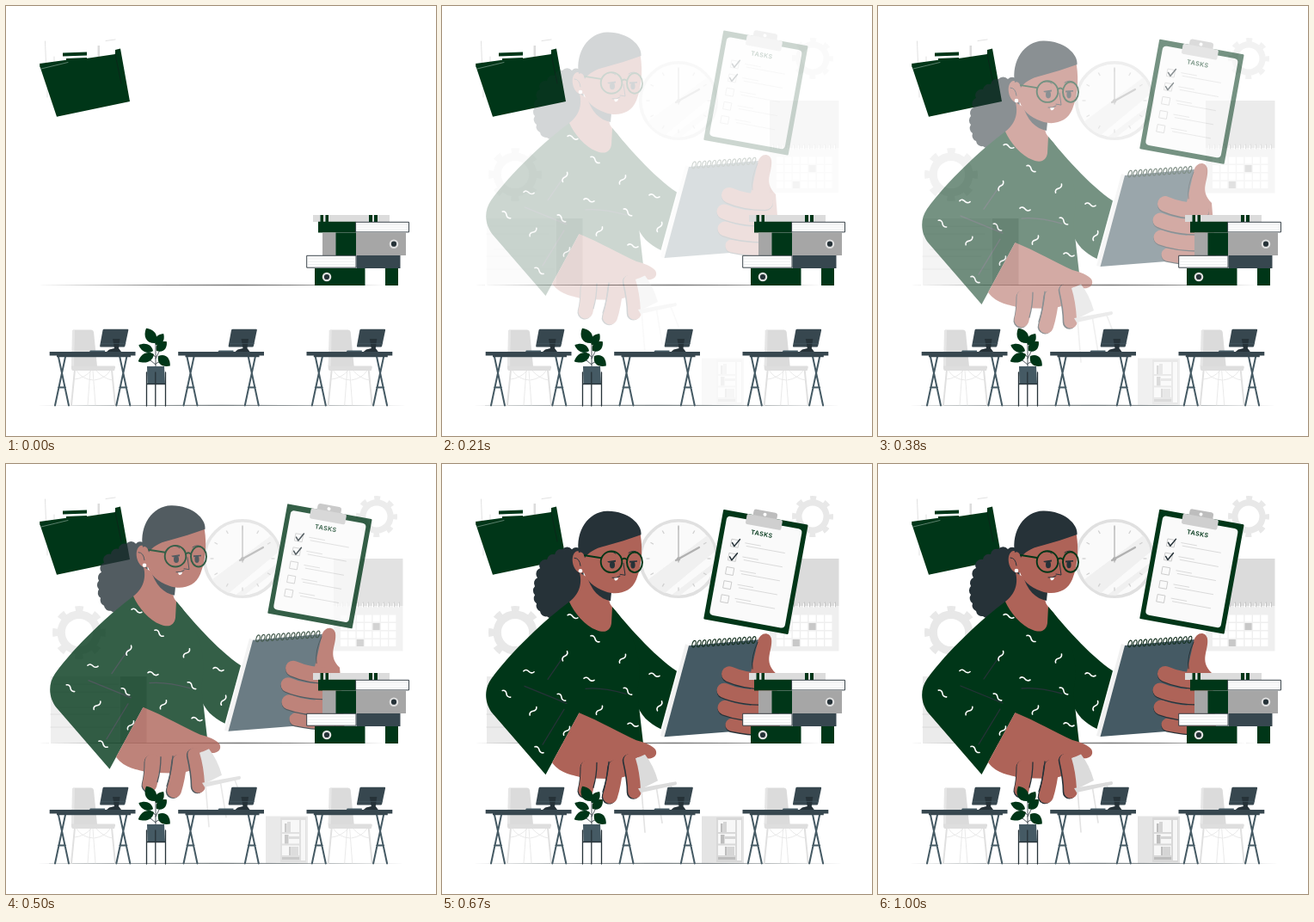
These frames come from a looping animation (500 px wide and 500 px high, 1.04 s). An HTML page:

```html
<!DOCTYPE html>
<html lang="en">
<head>
<meta charset="utf-8">
<style>
  html, body { margin: 0; width: 100%; height: 100%; overflow: hidden; background: #fff; }
  svg { display: block; width: 100%; height: 100%; }
  .green { fill: #003618; }
  .slate { fill: #455a64; }
  .dark { fill: #263238; }
  .skin { fill: #ae6358; }
  .line { fill: none; stroke-linecap: round; stroke-linejoin: round; }
</style>
</head>
<body>
<svg viewBox="0 0 500 500">
  <defs>
    <clipPath id="face"><circle cx="275" cy="110" r="43"/></clipPath>
    <g id="desk">
      <g class="line" stroke="#455a64" stroke-width="2" stroke-linecap="butt">
        <path id="trestle" d="M61 408L73 464.500 M69 408L57 464.500 M61 443.500H69"/>
        <use href="#trestle" x="71.300"/>
      </g>
      <path fill="#37474f" d="M50.700 402H150.500V406.500H50.700Z M59 406H145V408.300H59Z"/>
      <path fill="#37474f" d="M114 375.700H141.500Q142.500 375.700 142.300 377L138.500 395Q138.200 396.500 137 396.500H110Q109 396.500 109.200 395L112.500 377Q112.800 375.700 114 375.700Z"/>
      <path class="dark" d="M124 387H132.500L131 398L134 402H117L120 399.500L126 398Z"/>
      <path fill="#455a64" d="M98 400.500H115V402H97Z"/>
      <path class="line" stroke="#455a64" stroke-width=".6" d="M110.500 392.500H139"/>
    </g>
    <g id="chair">
      <path class="line" stroke="#e0e0e0" stroke-width="2" d="M80 423L76 464 M123 423L127 464"/>
      <path class="line" stroke="#e4e4e4" stroke-width=".8" d="M80 434Q91 433 99 424 M82 424Q88 434 101 435 M101 424L104 464 M98 424L95 464 M103 435Q116 433 121 424 M105 424Q114 434 124 435"/>
      <path fill="#dbdbdb" d="M78 376.500H99Q101.500 376.500 102 379L106 419H76Z"/>
      <path fill="#e6e6e6" d="M77 377H80L79 419H76Z"/>
      <path fill="#dedede" d="M76 418.500H126Q127.500 418.500 127 420.500L126 424H78Q76 424 76 421Z"/>
    </g>
    <path id="squiggle" class="line" stroke="#fff" stroke-width="1.600" d="M-6 -1C-4 -3-1.500-2 0 0S4 2.500 6 1"/>
  </defs>

  <g id="backdrop">
    <g id="gears" fill="none" stroke="#e8e8e8"></g>
    <circle cx="275" cy="110" r="44.300" fill="#fafafa" stroke="#e0e0e0" stroke-width="3.600"/>
    <g clip-path="url(#face)" fill="#f0f0f0">
      <path d="M232 140L310 82L322 98L252 156Z M262 156L320 112L322 118L270 158Z"/>
    </g>
    <g id="ticks" stroke="#cfcfcf" stroke-width="1.300"></g>
    <path class="line" stroke="#bdbdbd" stroke-width="1.500" d="M275 114V72"/>
    <path class="line" stroke="#b0b0b0" stroke-width="2.200" d="M272 112L299 97"/>
    <circle cx="275" cy="110.500" r="2.200" fill="#b0b0b0"/>

    <path fill="#ebebeb" d="M52 247H133V325H52Z"/>
    <path fill="#c6c6c6" d="M133 247H163.500V325H133Z"/>
    <path class="line" stroke="#d6d6d6" stroke-width=".9" d="M56 256H130 M52 265H124 M60 283H131 M52 291H120 M52 306H130"/>

    <path fill="#dbdbdb" d="M381 110H461.500V165H381Z"/>
    <path fill="#efefef" d="M381 165H461.500V217.500H381Z"/>
    <path stroke="#fff" stroke-width="5" stroke-dasharray="2 4" d="M384 164.500H460"/>
    <path stroke="#c4c4c4" stroke-width="6" stroke-dasharray="1 5" d="M385 163.500H460"/>
    <g id="days"></g>

    <path fill="#e4e4e4" d="M302 409.500H351V465H302Z"/>
    <path fill="#d8d8d8" d="M319 411H349V463H319Z"/>
    <path fill="#f7f7f7" d="M321 414H341V428H321Z M321 430H341V441.500H321Z M321 443.500H341V455H321Z M343 414H348V461H343Z"/>
    <path fill="#bdbdbd" d="M324 418H326.500V428H324Z M324 431H328.500V441.500H324Z M329 445H331.500V455H329Z M321 457H341V460H321Z"/>
    <path fill="#d5d5d5" d="M327 416H331V428H327Z M329 433H341V436H329Z M332 445H340V455H332Z"/>
  </g>

  <g id="folder">
    <path class="line" stroke="#d4d4d4" stroke-width=".7" d="M45.500 41L46.500 66 M116 40.500L127 39 M48 96V106 M56 59V65"/>
    <path fill="#dcdcdc" d="M106.500 46H109V60H106.500Z"/>
    <path class="green" d="M66 54.500L94 53.500V57.500L66 58.500Z M70 61L94 60V65L70 67Z M39 67L72 62.500V66L40 72Z"/>
    <path class="green" d="M39 69L127 56V51L133 49.500L144 111L59 128.700Z"/>
    <path class="line" stroke="#b9c9bf" stroke-width=".5" d="M41 73L72 65.500"/>
    <path class="line" stroke="#0f2219" stroke-width=".7" d="M127 56L134 90"/>
  </g>

  <path fill="#777" d="M36 324.500L270 323.800L441 324.500L270 325.300Z"/>
  <path fill="#777f82" d="M35 464.400L250 463.800L467 464.400L250 465.100Z"/>

  <g id="character">
    <path class="dark" id="bun"/>
    <path class="green" d="M198 166C212 183 246 223 273 240.500L254.500 308C240 301 231 292 226 278L205 210Z"/>
    <path class="green" d="M148 160C121 180 81 217 57 250C48 263 50 279 59 290L120.500 361L159.500 289L165 325H234L227 264C236 225 220 190 198 166Z"/>
    <path class="line" stroke="#263238" stroke-width="1.300" d="M143 221L123 250 M96 258L145 278 M167 261Q185 259 214 267 M117 326L142 285"/>
    <path class="skin" d="M160 126C164 142 157 153 148 160C154 173 166 188 180 193C190 197 196 193 197 185L198 166C193 160 194 155 196 148Z"/>
    <path class="dark" d="M168 128C173 147 184 157 196 159L197 149Z"/>
    <path class="skin" d="M162 101C180 80 212 80 230 78C233 92 234 114 226 134C220 149 204 153 190 148C176 143 168 135 165 126C152 130 147 104 157 101Z"/>
    <path class="dark" d="M159 103C155 78 170 55 192 54.500C216 54 233 70 231.500 82C218 87 204 91 190 95C177 98 170 103 166 109C165 103 162 101 159 103Z"/>
    <path class="line" stroke="#263238" stroke-width="1" d="M154 109Q160 109 161 118 M211 115L213 129L207 128 M189 104Q196 99 202 104 M217 103Q223 99 228 103 M198 132Q203 133 207 130"/>
    <path fill="#fff" d="M200 132.500L205 132Q204 136 201 135Z"/>
    <circle cx="161" cy="124" r="2.300" fill="#fff"/>
    <g class="dark">
      <ellipse cx="198" cy="117" rx="3" ry="4.300"/>
      <ellipse cx="222" cy="117" rx="2.600" ry="4.300"/>
      <path d="M192 113L202 111.500V113.500L194 114.500Z M218 112.500L227 112V113.500L218 114.500Z"/>
    </g>
    <g class="line" stroke="#003618" stroke-width="1.900">
      <circle cx="197" cy="113.500" r="12.300"/>
      <ellipse cx="224" cy="114" rx="9" ry="11.800"/>
      <path d="M166 106L185 109 M209 111Q212 108 215 111"/>
    </g>
    <g id="squiggles"></g>

    <path class="skin" d="M159.500 289C184 299 208 313 226 321C241 325 251 330 249 337C246 345 234 342 227 341L231 358L203 366L165 365C152 361 139 361 128 347Z"/>
    <g id="leftFingers" class="line"></g>
    <path class="line" stroke="#263238" stroke-width="1.300" d="M180 347Q180 362 176 376 M194 346Q193 362 187 381"/>

    <g fill="#dbdbdb">
      <path class="line" stroke="#e2e2e2" stroke-width="1.600" d="M232 379L236 428 M249 374L256 417 M265 371L275 397"/>
      <path d="M225 342Q231 340 236 337.500Q246 350 251 368L231 378Q230 358 225 342Z"/>
      <path d="M228 377L272 369Q274 371 272 373L231 382Z"/>
    </g>

    <path fill="#f0f0f0" d="M283 209L288 211L260 317.500L254 316Z"/>
    <path class="slate" d="M287 211L368 204L361 309L258.500 317Z"/>
    <g id="spiral" class="line" stroke="#14301f" stroke-width="1.100"></g>
    <path class="skin" d="M359 242L367 207C369 195 381 194 383 203C385 217 373 228 388 243L394 318H360Z"/>
    <path class="line" stroke="#263238" stroke-width="1" d="M367 207Q359 224 361 238"/>
    <g id="rightFingers" class="line"></g>

    <g transform="translate(327.300 52.500) rotate(10.300)">
      <rect class="green" width="100" height="129.500" rx="1"/>
      <path fill="#fafafa" d="M10 6.500H90Q94.500 6.500 94.500 11V119Q94.500 123.500 90 123.500H10Q5.500 123.500 5.500 119V11Q5.500 6.500 10 6.500Z"/>
      <rect x="35" y="-7" width="28" height="14" rx="3" fill="#bdbdbd"/>
      <rect x="28" y="0" width="42" height="12" rx="2" fill="#cfcfcf"/>
      <circle cx="48.500" cy="-2.800" r="2" fill="#fff"/>
      <text x="49" y="22.600" text-anchor="middle" font-family="Inter, Roboto, sans-serif" font-weight="600" font-size="7.200" letter-spacing=".4" fill="#003618">TASKS</text>
      <g id="tasks" class="line"></g>
    </g>
  </g>

  <g id="books">
    <path fill="#dcdcdc" d="M357 243H446V251H357Z"/>
    <path class="green" d="M365.500 243H369V251H365.500Z M371.500 243H375V251H371.500Z M422 243H426V251H422Z M428 243H432V251H428Z M363 250.700H407V263.500H363Z"/>
    <path fill="#fff" stroke="#263238" stroke-width=".9" d="M406.600 251.300H468.500V262.900H406.600Z"/>
    <path fill="#a6a6a6" d="M368 263.500H465V290H368Z"/>
    <path class="green" d="M383.500 263.500H407V290H383.500Z"/>
    <path fill="#fff" stroke="#263238" stroke-width=".9" d="M349.700 290.300H407V304.200H349.700Z"/>
    <path fill="#37474f" d="M407.500 290H458.500V305H407.500Z"/>
    <path class="line" stroke="#dde1e3" stroke-width=".6" d="M408 254.500H467 M408 257H467 M408 259.800H467 M351 294H405 M351 297.300H405 M351 300.600H405"/>
    <path fill="#fff" d="M417 305H441V324H417Z"/>
    <path class="green" d="M359 305H417.500V325H359Z M441 305H456V325H441Z"/>
    <g class="dark" stroke="#e0e0e0" stroke-width="2.200">
      <circle cx="451" cy="276.700" r="4.200"/>
      <circle cx="373" cy="315" r="4.200"/>
    </g>
  </g>

  <use href="#chair"/>
  <use href="#chair" x="298.700"/>
  <use href="#desk"/>
  <use href="#desk" x="149.500"/>
  <use href="#desk" x="298.800"/>

  <g id="plant">
    <path class="line" stroke="#263238" stroke-width=".8" d="M174 419V391 M174 408Q166 402 163 399 M174 410L181 396 M174 416L183 411 M174 417L163 408"/>
    <g id="leaves" class="green"></g>
    <path class="slate" d="M164 419H184L185 440H164.500Z"/>
    <path class="line" stroke="#263238" stroke-width="1.300" d="M163.500 426V465 M173.800 426V465 M185.500 426V465 M163.500 439.500H185.500"/>
  </g>
</svg>
<script>
const $ = id => document.getElementById(id);
const fill = (id, items) => { $(id).innerHTML = items.join(''); };
const range = n => [...Array(n).keys()];

// A dashed rim makes the gear teeth.
const gear = (x, y, r) => {
  const rim = r * 0.89, pitch = 2 * Math.PI * rim / 8;
  return `<circle cx="${x}" cy="${y}" r="${r * 0.67}" stroke-width="${r * 0.3}"/>
    <circle cx="${x}" cy="${y}" r="${rim}" stroke-width="${r * 0.22}"
      stroke-dasharray="${pitch * 0.42} ${pitch * 0.58}" stroke-dashoffset="${pitch * 0.21}"/>`;
};
fill('gears', [gear(85, 196, 31), gear(431, 61, 24)]);

fill('ticks', range(12).map(i =>
  `<path d="M275 72.500V76.500" transform="rotate(${i * 30} 275 110)"/>`));

fill('days', range(28).map(i => {
  const col = i % 7, row = Math.floor(i / 7);
  const marked = (col === 4 && row === 1) || (col === 2 && row === 3);
  return `<rect x="${389 + col * 9.4}" y="${175.5 + row * 9.5}" width="8" height="8" fill="${marked ? '#c8c8c8' : '#fff'}"/>`;
}));

// Scalloped curls joined by small arcs.
const curls = [[148, 167], [141, 174], [132, 177], [122, 177], [114, 171], [110, 162], [108, 152],
  [108, 142], [111, 132], [114, 121], [122, 111], [131, 105], [140, 99], [151, 99], [163, 105]];
$('bun').setAttribute('d',
  `M166 148L${curls[0]}` + curls.slice(1).map(point => `A7 7 0 0 1 ${point}`).join('') + 'Z');

const squiggles = [
  [152, 177, 5], [178, 203, 25], [210, 226, -65], [143, 223, -75], [101, 241, -5], [171, 250, 0],
  [247, 245, 0], [75, 267, 30], [139, 271, 30], [216, 264, 30], [106, 287, -60], [183, 286, -65],
  [222, 303, 0], [113, 332, 25], [145, 310, -65], [253, 281, -75]
];
fill('squiggles', squiggles.map(([x, y, turn]) =>
  `<use href="#squiggle" transform="translate(${x} ${y}) rotate(${turn})"/>`));

fill('spiral', range(13).map(i =>
  `<ellipse cx="${293 + i * 5.8}" cy="${209 - i * 0.4}" rx="1.900" ry="4" transform="rotate(18 ${293 + i * 5.8} ${209 - i * 0.4})"/>`));

// A rounded finger over its own dark, slightly shifted copy.
const finger = (curve, width, dx, dy) =>
  `<path d="${curve}" stroke="#263238" stroke-width="${width}" transform="translate(${dx} ${dy})"/>
   <path d="${curve}" stroke="#ae6358" stroke-width="${width}"/>`;

fill('leftFingers', [
  finger('M170 352Q170 368 167 379', 17, -1, 1),
  finger('M202 352Q200 372 195.500 386', 17, -1.3, 0.8),
  finger('M219 344Q224 366 224 381', 15.5, -1.5, 0.8)
]);
fill('rightFingers', [[337, 303, 307, 15], [329, 283, 290, 17], [328, 263, 271, 17], [334, 244, 252, 18]]
  .map(([x, y, end, width]) => finger(`M${x} ${y}Q${x + 18} ${end} 376 ${end}`, width, 0, 1.3)));

fill('tasks', range(5).map(i => {
  const y = 36.4 + i * 16.4;
  const tick = i < 2 ? `<path stroke="#263238" stroke-width="1.500" d="M17 ${y}l3 3.500l5 -9"/>` : '';
  return `<rect x="16" y="${y - 4.2}" width="8.500" height="8.500" stroke="#c4c4c4" stroke-width=".8"/>
    <path stroke="#cfcfcf" stroke-width=".7" d="M32 ${y - 2.5}H50 M34 ${y + 0.8}H79"/>${tick}`;
}));

// Each leaf: stalk point, length, width, direction in degrees.
const leaves = [
  [173, 392, 20, 12, -120], [174, 394, 16, 9, -55], [171, 401, 18, 9, 202],
  [175, 401, 16, 10, -42], [172, 405, 20, 10, 156], [177, 407, 18, 11, 40]
];
fill('leaves', leaves.map(([x, y, length, width, turn]) =>
  `<path transform="translate(${x} ${y}) rotate(${turn})"
    d="M0 0C${length * 0.25} ${-width * 0.75} ${length * 0.7} ${-width * 0.65} ${length} 0C${length * 0.7} ${width * 0.65} ${length * 0.25} ${width * 0.75} 0 0Z"/>`));

const LOOP = 1040, FRAME = 1000 / 24;

const bezier = (a, b, s) => 3 * a * s * (1 - s) ** 2 + 3 * b * s * s * (1 - s) + s ** 3;

// cubic-bezier(.36, -.01, .5, 1.38): overshoots before settling.
function ease(x) {
  if (x >= 1) return 1;
  let low = 0, high = 1;
  for (let i = 0; i < 24; i++) {
    const mid = (low + high) / 2;
    if (bezier(0.36, 0.5, mid) < x) low = mid; else high = mid;
  }
  return bezier(-0.01, 1.38, low);
}

function render(time) {
  const step = Math.floor((time % LOOP + 5.1) / FRAME);
  const progress = step < 3 ? 0 : ease((step + 0.6) / 24);
  const opacity = Math.max(0, Math.min(1, progress));
  $('backdrop').setAttribute('opacity', opacity);
  $('character').setAttribute('opacity', opacity);
  $('character').setAttribute('transform', `translate(0 ${-30 * (1 - progress)})`);
}

const start = performance.now();
function loop() {
  render(performance.now() - start);
  requestAnimationFrame(loop);
}
loop();
</script>
</body>
</html>
```
